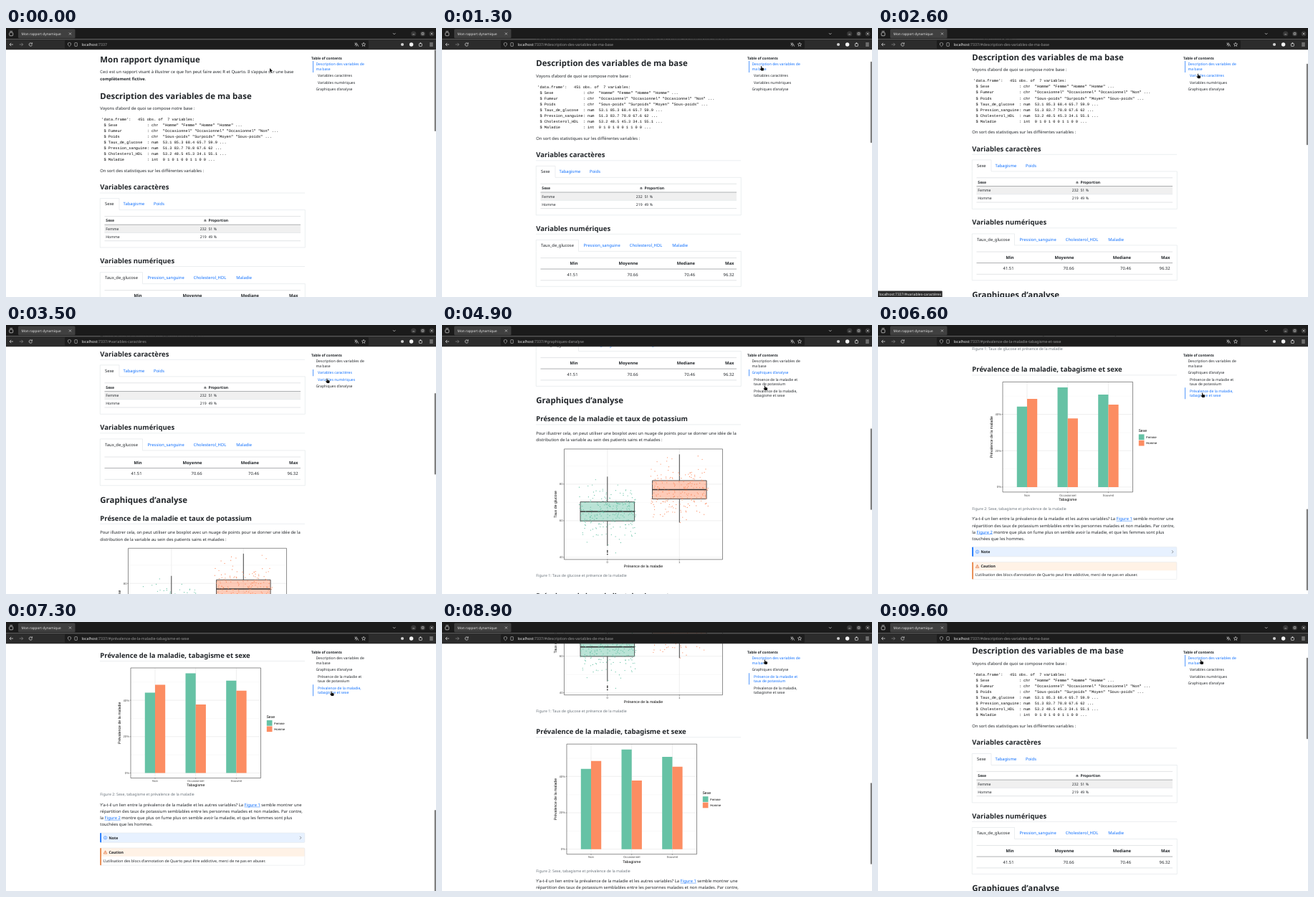
Recreate the animation shown at these times as an HTML page with a canvas. Size 600 by 375 pixels, loop 10000 ms.

```html
<!DOCTYPE html>
<html lang="fr">
<head>
<meta charset="utf-8">
<title>Mon rapport dynamique</title>
<style>
html, body { margin: 0; width: 100%; height: 100%; overflow: hidden; background: #fff; }
canvas { display: block; width: 100vw; height: 100vh; }
</style>
</head>
<body>
<canvas id="stage"></canvas>
<script>
const canvas = document.getElementById('stage');
const ctx = canvas.getContext('2d');
const LOOP = 10000, STEP = 100;
const UI = '"Noto Sans", "Open Sans", sans-serif';
const MONO = '"Liberation Mono", monospace';
const PLOT = '"Liberation Sans", Arial, sans-serif';
const INK = '#212529', BLUE = '#0d6efd', RULE = '#dee2e6', MUTED = '#6c757d';
const GREEN = '#66c2a5', ORANGE = '#fc8d62';
const H2 = 11.45, H3 = 9.52, BODY = 5.84, SMALL = 5.15;

// Clicks on the table of contents: time, scroll target, anchor, start of the link preview
const clicks = [
  { t: 1040, y: 53.7, id: 'description-des-variables-de-ma-base', on: 800 },
  { t: 2840, y: 182, id: 'variables-caractères', on: 2300 },
  { t: 3640, y: 283.5, id: 'variables-numériques', on: 3640 },
  { t: 4800, y: 384.5, id: 'graphiques-danalyse', on: 4400 },
  { t: 6240, y: 651.5, id: 'prévalence-de-la-maladie-tabagisme-et-sexe', on: 5300 },
  { t: 8840, y: 53.7, id: 'description-des-variables-de-ma-base', on: 7900 }
];

// Pointer path: time, x, y
const path = [
  [0, 368, 56], [800, 445, 53], [1600, 445, 53], [2700, 446, 64], [2900, 446, 64],
  [3500, 447.5, 74.5], [3900, 447.5, 74.5], [4700, 450, 84.5], [4900, 450, 84.5],
  [5500, 451, 94.5], [5600, 451, 94.5], [5900, 452, 94.5], [6700, 452, 94.5],
  [7300, 453.5, 96.5], [7800, 450, 43], [8100, 450, 52.5], [LOOP, 450, 52.5]
];

// Sections: heading position on the page, contents lines, level, group
const sections = [
  { y: 94.5, lines: ['Description des variables de', 'ma base'], level: 1 },
  { y: 222, lines: ['Variables caractères'], level: 2, group: 0 },
  { y: 324.5, lines: ['Variables numériques'], level: 2, group: 0 },
  { y: 425.5, lines: ['Graphiques d’analyse'], level: 1 },
  { y: 451, lines: ['Présence de la maladie et', 'taux de potassium'], level: 2, group: 3 },
  { y: 698, lines: ['Prévalence de la maladie,', 'tabagisme et sexe'], level: 2, group: 3 }
];

function rng(seed) {
  return () => (seed = (seed * 16807) % 2147483647) / 2147483647;
}

function text(s, x, y, size, o = {}) {
  const K = 8; // laid out large, then scaled, for fractional advances
  ctx.save();
  ctx.translate(x, y);
  if (o.turn) ctx.rotate(-Math.PI / 2);
  ctx.scale(1 / K, 1 / K);
  ctx.font = `${o.bold ? 700 : 400} ${size * K}px ${o.font || UI}`;
  ctx.textAlign = o.align || 'left';
  ctx.fillStyle = o.color || INK;
  ctx.fillText(s, 0, 0.355 * size * K);
  const w = ctx.measureText(s).width / K;
  ctx.restore();
  return w;
}

function rect(x, y, w, h, fill, radius = 0) {
  ctx.fillStyle = fill;
  ctx.beginPath();
  ctx.roundRect(x, y, w, h, radius);
  ctx.fill();
}

function frame(x, y, w, h, color, width = 0.6, radius = 0) {
  ctx.strokeStyle = color;
  ctx.lineWidth = width;
  ctx.beginPath();
  ctx.roundRect(x, y, w, h, radius);
  ctx.stroke();
}

function line(points, color = RULE, width = 0.6, close = false) {
  ctx.strokeStyle = color;
  ctx.lineWidth = width;
  ctx.beginPath();
  for (let i = 0; i < points.length; i += 2) ctx.lineTo(points[i], points[i + 1]);
  if (close) ctx.closePath();
  ctx.stroke();
}

function dot(x, y, r, fill) {
  ctx.fillStyle = fill;
  ctx.beginPath();
  ctx.arc(x, y, r, 0, 7);
  ctx.fill();
}

function ring(x, y, r, color, width = 0.7, from = 0, to = 7) {
  ctx.strokeStyle = color;
  ctx.lineWidth = width;
  ctx.beginPath();
  ctx.arc(x, y, r, from, to);
  ctx.stroke();
}

const hline = (y, x1, x2, color, width) => line([x1, y, x2, y], color, width);

// ---- page ----

function heading3(s, y) {
  text(s, 131.3, y, H3, { bold: true });
  hline(y + 8, 131, 417);
}

function tabs(names, xs, y, activeRight, bottom) {
  const base = y + 8.3;
  line([131.3, base, 131.3, y - 7.7, activeRight, y - 7.7, activeRight, base, 417.3, base,
    417.3, bottom, 131.3, bottom], RULE, 0.6, true);
  line([131.7, base, activeRight - 0.4, base], '#fff', 1);
  names.forEach((s, i) => text(s, xs[i], y, BODY, { color: i ? BLUE : INK }));
}

function intro() {
  text('Mon rapport dynamique', 131.3, 44, H2, { bold: true });
  text('Ceci est un rapport visant à illustrer ce que l’on peut faire avec R et Quarto. Il s’appuie sur une base', 131.3, 61.3, BODY);
  const w = text('complètement fictive', 131.3, 70.6, BODY, { bold: true });
  text('.', 131.3 + w, 70.6, BODY);
  text('Description des variables de ma base', 131.3, 94.5, H2, { bold: true });
  text('Voyons d’abord de quoi se compose notre base :', 131.3, 112, BODY);
  [
    "'data.frame':   451 obs. of  7 variables:",
    ' $ Sexe             : chr  "Homme" "Femme" "Homme" "Homme" ...',
    ' $ Fumeur           : chr  "Occasionnel" "Occasionnel" "Occasionnel" "Non" ...',
    ' $ Poids            : chr  "Sous-poids" "Surpoids" "Moyen" "Sous-poids" ...',
    ' $ Taux_de_glucose  : num  53.1 85.3 68.4 65.7 59.9 ...',
    ' $ Pression_sanguine: num  51.3 83.7 78.8 67.6 62 ...',
    ' $ Cholesterol_HDL  : num  53.2 48.5 45.3 34.1 55.1 ...',
    ' $ Maladie          : int  0 1 0 1 0 0 1 1 0 0 ...'
  ].forEach((s, i) => text(s, 133.3, 127.2 + i * 8.05, 5.28, { font: MONO, color: '#000' }));
  text('On sort des statistiques sur les différentes variables :', 131.3, 198.7, BODY);
}

function tables() {
  heading3('Variables caractères', 222);
  tabs(['Sexe', 'Tabagisme', 'Poids'], [138, 163.6, 206], 245.3, 158, 306);
  rect(137.5, 274.4, 273.5, 11, '#f0f0f0');
  hline(262.5, 137.5, 411, '#cfd2d5');
  hline(274.2, 137.5, 411, '#8d9092', 0.7);
  hline(285.5, 137.5, 411);
  hline(296.7, 137.5, 411, '#cfd2d5');
  [['Sexe', 'n', 'Proportion'], ['Femme', '232', '51 %'], ['Homme', '219', '49 %']].forEach((row, i) => {
    const y = [268.5, 279.9, 291][i], bold = i === 0;
    text(row[0], 139.3, y, SMALL, { bold });
    text(row[1], 279.6, y, SMALL, { bold, align: 'right' });
    text(row[2], 282.4, y, SMALL, { bold });
  });

  heading3('Variables numériques', 324.5);
  tabs(['Taux_de_glucose', 'Pression_sanguine', 'Cholesterol_HDL', 'Maladie'],
    [138, 197.5, 261.8, 321.3], 348.3, 190.5, 405.5);
  hline(365.7, 137.5, 411, '#cfd2d5');
  hline(381.2, 137.5, 411, '#8d9092', 0.7);
  hline(397, 137.5, 411, '#cfd2d5');
  const right = [189.5, 273.5, 353, 407.5];
  ['Min', 'Moyenne', 'Mediane', 'Max'].forEach((s, i) => text(s, right[i], 373.4, BODY, { bold: true, align: 'right' }));
  ['41.51', '70.66', '70.46', '96.32'].forEach((s, i) => text(s, right[i], 388.8, BODY, { align: 'right' }));
}

const glucoseY = v => 644 - (v - 40) * 2.55;

function sample(n, cx, mean, sd, lo, hi, rand) {
  const out = [];
  while (out.length < n) {
    const v = mean + sd * Math.sqrt(-2 * Math.log(rand())) * Math.cos(2 * Math.PI * rand());
    if (v > lo && v < hi) out.push([cx + (rand() - 0.5) * 80.5, glucoseY(v)]);
  }
  return out;
}

const rand = rng(4217);
const groups = [
  { x: 230.8, fill: 'rgba(102,194,165,.45)', color: GREEN, box: [531.5, 566.7, 580, 593.3, 628],
    points: sample(232, 230.8, 65, 7.8, 41.5, 84, rand) },
  { x: 331.3, fill: 'rgba(252,141,98,.45)', color: ORANGE, box: [500.5, 537, 549.7, 562.6, 595.5],
    points: sample(219, 331.3, 76.6, 7.5, 59, 96.3, rand) }
];

function plotLabel(s, x, y, o = {}) {
  text(s, x, y, o.size || 4.25, { font: PLOT, color: '#4d4d4d', align: 'center', ...o });
}

function plotTitle(s, x, y, o) {
  plotLabel(s, x, y, { size: 5.2, color: '#000', ...o });
}

function boxplot() {
  [50, 70, 90].forEach(v => hline(glucoseY(v), 170.5, 391.5, '#f2f2f2', 0.4));
  [40, 60, 80].forEach(v => {
    const y = glucoseY(v);
    hline(y, 170.5, 391.5, '#e8e8e8', 0.7);
    hline(y, 169.3, 170.5, '#333', 0.5);
    plotLabel(String(v), 168.6, y, { align: 'right' });
  });
  groups.forEach(({ x }, i) => {
    line([x, 493, x, 647], '#e8e8e8', 0.7);
    line([x, 647, x, 648.2], '#333', 0.5);
    plotLabel(String(i), x, 651);
  });
  for (const { x, fill, box, color, points } of groups) {
    const [top, q3, mid, q1, low] = box;
    line([x, top, x, q3], '#333', 0.9);
    line([x, q1, x, low], '#333', 0.9);
    rect(x - 37.8, q3, 75.6, q1 - q3, fill);
    frame(x - 37.8, q3, 75.6, q1 - q3, '#333', 0.8);
    hline(mid, x - 37.8, x + 37.8, '#333', 1.5);
    for (const [px, py] of points) dot(px, py, 0.62, color);
  }
  [634.7, 636.5, 639.7].forEach(y => dot(230.8, y, 0.9, '#333'));
  frame(170.5, 493, 221, 154, '#444', 0.6);
  plotTitle('Taux de glucose', 158.6, 570, { turn: true });
  plotTitle('Présence de la maladie', 281, 656.2);
}

function barplot() {
  const zero = 862, unit = 2.535;
  [10, 30, 50].forEach(v => hline(zero - v * unit, 174, 355.5, '#f2f2f2', 0.4));
  [0, 20, 40].forEach(v => {
    const y = zero - v * unit;
    hline(y, 174, 355.5, '#e8e8e8', 0.7);
    hline(y, 172.8, 174, '#333', 0.5);
    plotLabel(v + '%', 172, y, { align: 'right' });
  });
  [['Non', 44.2, 48.5], ['Occasionnel', 54.8, 37.7], ['Souvent', 50.8, 45.3]].forEach(([s, f, h], i) => {
    const x = 208 + i * 56.7;
    line([x, 715.5, x, 869], '#e8e8e8', 0.7);
    line([x, 869, x, 870.2], '#333', 0.5);
    rect(x - 14.2, zero - f * unit, 14.2, f * unit, GREEN);
    rect(x, zero - h * unit, 14.2, h * unit, ORANGE);
    plotLabel(s, x, 873.2);
  });
  frame(174, 715.5, 181.5, 153.5, '#444', 0.6);
  plotTitle('Prévalence de la maladie', 158.6, 792.3, { turn: true });
  plotTitle('Tabagisme', 264.7, 879);
  plotTitle('Sexe', 363.4, 783.3, { align: 'left' });
  [['Femme', GREEN], ['Homme', ORANGE]].forEach(([s, c], i) => {
    rect(363.8, 788.5 + i * 8.4, 7.7, 7.7, c);
    plotLabel(s, 374.3, 792.5 + i * 8.4, { align: 'left', color: '#000' });
  });
}

// Pieces starting with "@" are underlined links
function flow(pieces, y) {
  let x = 131.3;
  for (const p of pieces) {
    const link = p[0] === '@';
    const w = text(link ? p.slice(1) : p, x, y, BODY, { color: link ? BLUE : INK });
    if (link) hline(y + 3, x, x + w, BLUE, 0.45);
    x += w;
  }
}

function analysis() {
  text('Graphiques d’analyse', 131.3, 425.5, H2, { bold: true });
  heading3('Présence de la maladie et taux de potassium', 451);
  text('Pour illustrer cela, on peut utiliser une boxplot avec un nuage de points pour se donner une idée de la', 131.3, 471, BODY);
  text('distribution de la variable au sein des patients sains et malades :', 131.3, 480.3, BODY);
  boxplot();
  text('Figure 1: Taux de glucose et présence de la maladie', 131.3, 669.3, 5.25, { color: MUTED });
  heading3('Prévalence de la maladie, tabagisme et sexe', 698);
  barplot();
  text('Figure 2: Sexe, tabagisme et prévalence de la maladie', 131.3, 892, 5.25, { color: MUTED });
  flow(['Y’a-t-il un lien entre la prévalence de la maladie et les autres variables? La ', '@Figure 1', ' semble montrer une'], 906.4);
  flow(['répartition des taux de potassium semblables entre les personnes malades et non malades. Par contre,'], 915.6);
  flow(['la ', '@Figure 2', ' montre que plus on fume plus on semble avoir la maladie, et que les femmes sont plus'], 924.7);
  flow(['touchées que les hommes.'], 933.8);
}

function callouts() {
  rect(131.5, 945.5, 285.3, 13.4, '#e7f1ff', 1);
  frame(131.5, 945.5, 285.3, 13.4, RULE, 0.5, 1);
  rect(131.3, 945.5, 1.7, 13.4, BLUE, 0.8);
  ring(138.6, 952.3, 2.2, BLUE, 0.5);
  line([138.6, 951.8, 138.6, 953.6], BLUE, 0.6);
  dot(138.6, 950.9, 0.35, BLUE);
  text('Note', 143.4, 952.4, 5.25, { bold: true });
  line([410, 950.3, 411.9, 952.3, 410, 954.3], '#555', 0.6);

  rect(131.5, 966.5, 285.3, 11.8, '#fff2e6', 1);
  frame(131.5, 966.5, 285.3, 24.2, RULE, 0.5, 1);
  rect(131.3, 966.5, 1.7, 24.2, '#e8803f', 0.8);
  line([138.6, 970.3, 140.9, 974.5, 136.3, 974.5], '#e0703a', 0.7, true);
  line([138.6, 971.7, 138.6, 973.6], '#e0703a', 0.6);
  text('Caution', 143.4, 972.5, 5.25, { bold: true });
  text('L’utilisation des blocs d’annotation de Quarto peut être addictive, merci de ne pas en abuser.', 136, 984.4, 5.25);
}

// ---- table of contents ----

function contents(scroll, pointer, stale) {
  let active = 0;
  sections.forEach((s, i) => { if (s.y - scroll < 115) active = i; });
  const open = sections[active].group ?? active;
  text('Table of contents', 426, 41.8, 5, { bold: true });
  let top = 46;
  sections.forEach((s, i) => {
    if (s.level === 2 && s.group !== open) return;
    const h = s.lines.length * 6.7 + 2.6;
    const hover = !stale && pointer.x > 428 && pointer.y >= top && pointer.y < top + h;
    const color = i === active || hover ? BLUE : INK;
    if (i === active) rect(428, top, 0.7, h, BLUE);
    s.lines.forEach((l, k) => text(l, s.level === 1 ? 432.4 : 435, top + 4.6 + k * 6.7, 5.1, { color }));
    top += h;
  });
  return pointer.x > 428 && pointer.y >= 46 && pointer.y < top;
}

// ---- browser ----

function chrome(anchor) {
  const W = '#e4e4e4';
  rect(0, 0, 600, 15.5, '#1b1b1b');
  rect(0, 15.5, 600, 14.7, '#2c2c2c');
  rect(17, 1.6, 79.5, 12.6, '#404040', 1.5);
  text('Mon rapport dynamique', 21.6, 8, 4.78, { color: W });
  line([88, 6.5, 91, 9.5], W, 0.6);
  line([88, 9.5, 91, 6.5], W, 0.6);
  frame(4.7, 6.3, 5, 4.5, W, 0.7, 1);
  hline(4.7, 5.3, 9.1, W, 0.7);
  line([540, 7.2, 541.7, 8.9, 543.4, 7.2], W, 0.7);
  [568.7, 581.5, 594].forEach(x => dot(x, 8, 3.6, '#383838'));
  hline(8.9, 567.3, 570.1, W, 0.6);
  frame(580.2, 6.7, 2.6, 2.6, W, 0.6);
  line([592.7, 6.7, 595.3, 9.3], W, 0.6);
  line([592.7, 9.3, 595.3, 6.7], W, 0.6);

  line([10, 23, 5, 23], W, 0.7);
  line([7.2, 20.8, 5, 23, 7.2, 25.2], W, 0.7);
  line([18.7, 23, 23.7, 23], '#8a8a8a', 0.7);
  line([21.5, 20.8, 23.7, 23, 21.5, 25.2], '#8a8a8a', 0.7);
  ring(34.4, 23, 2.2, W, 0.7, 0.3, 5.4);
  line([36.6, 20.3, 36.6, 22.2, 34.7, 22.2], W, 0.7);

  rect(82, 17.3, 424, 11.5, '#1c1c1c', 1.4);
  line([88.5, 20.4, 90.6, 21.2, 90.3, 24, 88.5, 25.7, 86.7, 24, 86.4, 21.2], '#c8c8c8', 0.6, true);
  frame(95.8, 20.6, 3.6, 4.8, '#c8c8c8', 0.6, 0.5);
  const w = text('localhost', 105.5, 23, 5.25, { color: '#f2f2f2' });
  text(':7337' + (anchor ? '/#' + anchor : ''), 105.5 + w, 23, 5.25, { color: '#9a9a9a' });
  line([486.4, 21.2, 490, 21.2], W, 0.6);
  line([489.3, 21.2, 486.6, 24.4], W, 0.6);
  line([487, 22, 489, 24], W, 0.6);
  line([488.6, 25.8, 490.2, 22.4, 491.8, 25.8], W, 0.6);
  const star = [];
  for (let i = 0; i < 10; i++) {
    const a = i * Math.PI / 5 - Math.PI / 2, r = i % 2 ? 1.3 : 2.8;
    star.push(499 + r * Math.cos(a), 23.1 + r * Math.sin(a));
  }
  line(star, W, 0.6, true);
  dot(553, 23, 2.1, '#d0d0d0');
  dot(565.6, 23, 2.7, '#f4f4f4');
  frame(576.4, 21.7, 4, 3.7, W, 0.7, 0.5);
  dot(578.4, 21.2, 0.9, W);
  [21, 23, 25].forEach(y => hline(y, 591.2, 595.8, W, 0.7));
}

function status(id) {
  const s = 'localhost:7337/#' + id;
  ctx.font = `40.4px ${UI}`;
  const w = ctx.measureText(s).width / 8;
  rect(0, 366.6, w + 3, 8.4, '#2b2b2b', [0, 1, 0, 0]);
  text(s, 1.4, 370.9, 5.05, { color: '#f0f0f0' });
}

function cursor({ x, y }, hand) {
  const shape = hand
    ? [0, 0, 0.9, 0, 1.1, 2.3, 3.9, 2.9, 4.2, 4.4, 3.5, 6.5, 0.4, 6.5, -1.5, 4, -1, 3.4, -0.1, 4]
    : [0, 0, 0, 5.6, 1.3, 4.4, 2.2, 6.3, 3.1, 5.9, 2.2, 4.1, 4, 4];
  ctx.save();
  ctx.translate(x, y);
  ctx.lineJoin = 'round';
  line(shape, '#fff', 1, true);
  ctx.fillStyle = '#111';
  ctx.fill();
  ctx.restore();
}

// ---- motion ----

function scrollAt(t) {
  let y = 0;
  for (const c of clicks) {
    if (t < c.t) break;
    const u = (t - c.t) * 0.0127; // critically damped spring
    y += (c.y - y) * (1 - (1 + u) * Math.exp(-u));
  }
  return y;
}

function pointerAt(t) {
  const i = path.findIndex(p => p[0] > t);
  const [t0, x0, y0] = path[i - 1], [t1, x1, y1] = path[i];
  const u = (t - t0) / (t1 - t0), e = u * u * (3 - 2 * u);
  return { x: x0 + (x1 - x0) * e, y: y0 + (y1 - y0) * e };
}

function draw(t) {
  const scroll = scrollAt(t), pointer = pointerAt(t);
  const last = clicks.filter(c => t >= c.t).pop();
  const preview = clicks.find(c => t >= c.on && t < c.t);
  rect(0, 0, 600, 375, '#fff');
  ctx.save();
  ctx.translate(0, -scroll);
  intro();
  tables();
  analysis();
  callouts();
  ctx.restore();
  // The list has just folded under a resting pointer: no hover until it moves
  const hand = contents(scroll, pointer, t >= 4800 && t < 5000);
  rect(597.8, 30.6 + scroll * 0.355, 2.2, 113.5, '#808080', 1);
  chrome(last && last.id);
  if (preview) status(preview.id);
  cursor(pointer, hand);
}

function resize() {
  const dpr = window.devicePixelRatio || 1;
  canvas.width = Math.round(innerWidth * dpr);
  canvas.height = Math.round(innerHeight * dpr);
}

const start = performance.now();
function tick() {
  const t = Math.max(0, performance.now() - start) % LOOP;
  ctx.setTransform(canvas.width / 600, 0, 0, canvas.height / 375, 0, 0);
  ctx.textRendering = 'geometricPrecision';
  draw(Math.floor(t / STEP) * STEP);
  requestAnimationFrame(tick);
}
addEventListener('resize', resize);
resize();
tick();
</script>
</body>
</html>
```
